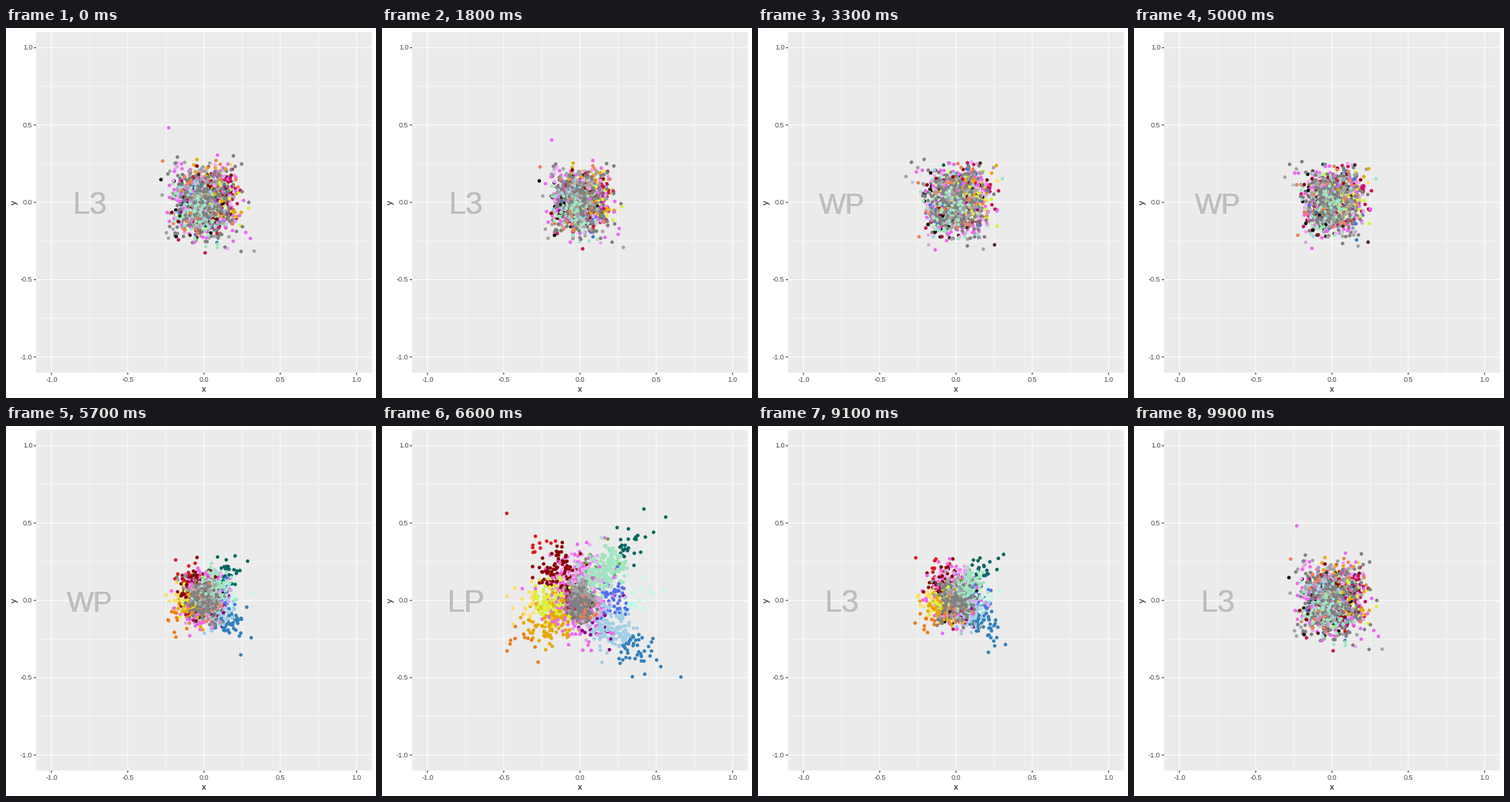
Animation, 480 px wide and 480 px high, one loop 10 s. Source, as a matplotlib script:

```python
import numpy as np
import matplotlib.pyplot as plt
from matplotlib.animation import FuncAnimation

SIZE, DPI = 480, 80
PX = 72 / DPI                      # points per pixel
CX, CY = 256.85, 226.25            # pixel position of the data origin
SX, SY = 197.95, 200.6             # pixels per data unit
LEFT, RIGHT, TOP, BOTTOM = 39, 474.5, 5.5, 447
FRAMES = 100

COLOURS = {
    "grey": "#808080", "silver": "#a3a3a3", "black": "#000000",
    "brown": "#4a2c20", "crimson": "#c8105a", "coral": "#ee8056",
    "pale": "#dfffc8", "orchid": "#ee66f2", "lilac": "#f2a2f6",
    "plum": "#d8a8dc", "wine": "#8b0000", "red": "#de1a1e",
    "mint": "#9fe6c0", "teal": "#00665e", "green": "#5aa82e",
    "lime": "#dcf03c", "yellow": "#ffe05a", "gold": "#e6a800",
    "orange": "#ee7a14", "blue": "#5070f0", "cyan": "#b8ffe8",
    "sky": "#a2cfe6", "steel": "#3080bc", "purple": "#8b008b",
}

# Colours around the middle of LP: count, offset, width
BLOBS = {
    "orchid": (290, 0, 0, 23), "lilac": (110, 2, -24, 14),
    "plum": (90, 10, 8, 14), "pale": (50, 14, -8, 9),
    "crimson": (80, -12, 0, 7), "brown": (45, 0, 0, 7),
    "black": (50, 0, 0, 7), "coral": (50, 8, 12, 5),
    "silver": (150, 0, -7, 9), "grey": (340, 0, 3, 8),
}

# Colours fanning outwards in LP: inner, outer, angle, mean reach, count
SPOKES = [
    ("blue", "cyan", 3, 46, 68), ("mint", "teal", 49, 54, 215),
    ("green", "green", 65, 42, 14), ("wine", "red", 125, 52, 112),
    ("lime", "yellow", 180, 40, 168), ("gold", "orange", 218, 52, 124),
    ("purple", "purple", 298, 42, 22), ("sky", "steel", 318, 62, 205),
]

# Direction in which a colour leans in L3 and WP
LEAN = {"crimson": 0, "lime": 20, "gold": 45, "sky": 130, "black": 190,
        "mint": 235}

STATES = ["L3", "WP", "LP"]
LABEL_SIZE = [40, 37, 40]
KEYS = [16, 33, 49, 66, 83, 99]
STEPS = [0, 1, 1, 2, 2, 3]

rng = np.random.default_rng(7)


def polar(degrees):
    a = np.radians(degrees)
    return np.array((np.cos(a), -np.sin(a)))


def crossed_cloud(names):
    """Round cloud drawn out along its diagonals."""
    n = len(names)
    pts = rng.normal(0, (16, 17.5), (n, 2))
    angle = np.arctan2(pts[:, 1], pts[:, 0])
    tail = rng.exponential(0.28, n) * np.sin(2 * angle) ** 2
    central = np.isin(names, list(BLOBS))
    pts *= ((1 + tail) * np.where(central, 1, 0.75))[:, None]
    for name, degrees in LEAN.items():
        pts[names == name] += 11 * polar(degrees)
    return (CX, CY) + pts


def fanned_cloud():
    names, parts = [], []
    for name, (n, dx, dy, width) in BLOBS.items():
        parts.append(rng.normal((dx, dy), (width, 1.25 * width), (n, 2)))
        names += [name] * n
    for inner, outer, degrees, reach, n in SPOKES:
        r = rng.gamma(6, reach / 6, n)
        side = rng.normal(0, 13, n)
        parts.append(np.outer(r, polar(degrees))
                     + np.outer(side, polar(degrees + 90)))
        cut = 60 + 20 * abs(np.sin(2 * np.radians(degrees)))
        names += list(np.where(r > cut, outer, inner))
    return np.array(names), (CX, CY) + np.concatenate(parts)


def build_clouds():
    names, fan = fanned_cloud()
    lift = 0.3 * np.isin(names, ["grey", "silver", "mint", "coral"])
    rank = np.argsort(rng.random(len(names)) + lift)
    names, fan = names[rank], fan[rank]
    clouds = [crossed_cloud(names), crossed_cloud(names), fan]
    return clouds, [COLOURS[name] for name in names]


def write(x, y, text, size, colour, **kw):
    return ax.text(x, y, text, fontsize=size * PX, color=colour,
                   family="Liberation Sans", **kw)


def line(xs, ys, colour, width):
    ax.plot(xs, ys, color=colour, lw=width * PX, solid_capstyle="butt",
            snap=False)


def draw_panel():
    ax.add_patch(plt.Rectangle((LEFT, TOP), RIGHT - LEFT, BOTTOM - TOP,
                               fc="#ebebeb", ec="none", snap=False))
    minor, major = (-0.75, -0.25, 0.25, 0.75), (-1, -0.5, 0, 0.5, 1)
    for values, width in ((minor, 0.53), (major, 1.07)):
        for v in values:
            x, y = CX + v * SX, CY - v * SY
            line([x, x], [TOP, BOTTOM], "white", width)
            line([LEFT, RIGHT], [y, y], "white", width)
    for v in major:
        x, y = CX + v * SX, CY - v * SY
        line([x, x], [BOTTOM, BOTTOM + 2.75], "#333333", 1.07)
        line([LEFT - 2.75, LEFT], [y, y], "#333333", 1.07)
        write(x, 459, f"{v:.1f}", 9, "#4d4d4d", ha="center")
        write(34.5, y + 2.7, f"{v:.1f}", 9, "#4d4d4d", ha="right")
    write(CX, 471.7, "x", 11, "black", ha="center")
    write(11, CY, "y", 11, "black", ha="center", va="center", rotation=90)


fig = plt.figure(figsize=(SIZE / DPI, SIZE / DPI), dpi=DPI, facecolor="white")
ax = fig.add_axes([0, 0, 1, 1])
ax.axis("off")
draw_panel()

clouds, colours = build_clouds()
dots = ax.scatter(*clouds[0].T, s=(4.6 * PX) ** 2, c=colours, lw=0, zorder=3)
# Stacked copies harden the letter edges.
labels = [write(108.9, 240.6, STATES[0], LABEL_SIZE[0], "#bebebe", ha="center")
          for _ in range(5)]
ax.set_xlim(0, SIZE)
ax.set_ylim(SIZE, 0)


def update(i):
    pos = np.interp(i, KEYS, STEPS)
    now = int(pos)
    start, end = clouds[now % 3], clouds[(now + 1) % 3]
    dots.set_offsets(start + (end - start) * (pos - now))
    state = int(pos + 0.5) % 3
    for label in labels:
        label.set_text(STATES[state])
        label.set_fontsize(LABEL_SIZE[state] * PX)
    return [dots, *labels]


anim = FuncAnimation(fig, update, frames=FRAMES, interval=100,
                     repeat=True, repeat_delay=0, blit=False)
plt.show()
```
